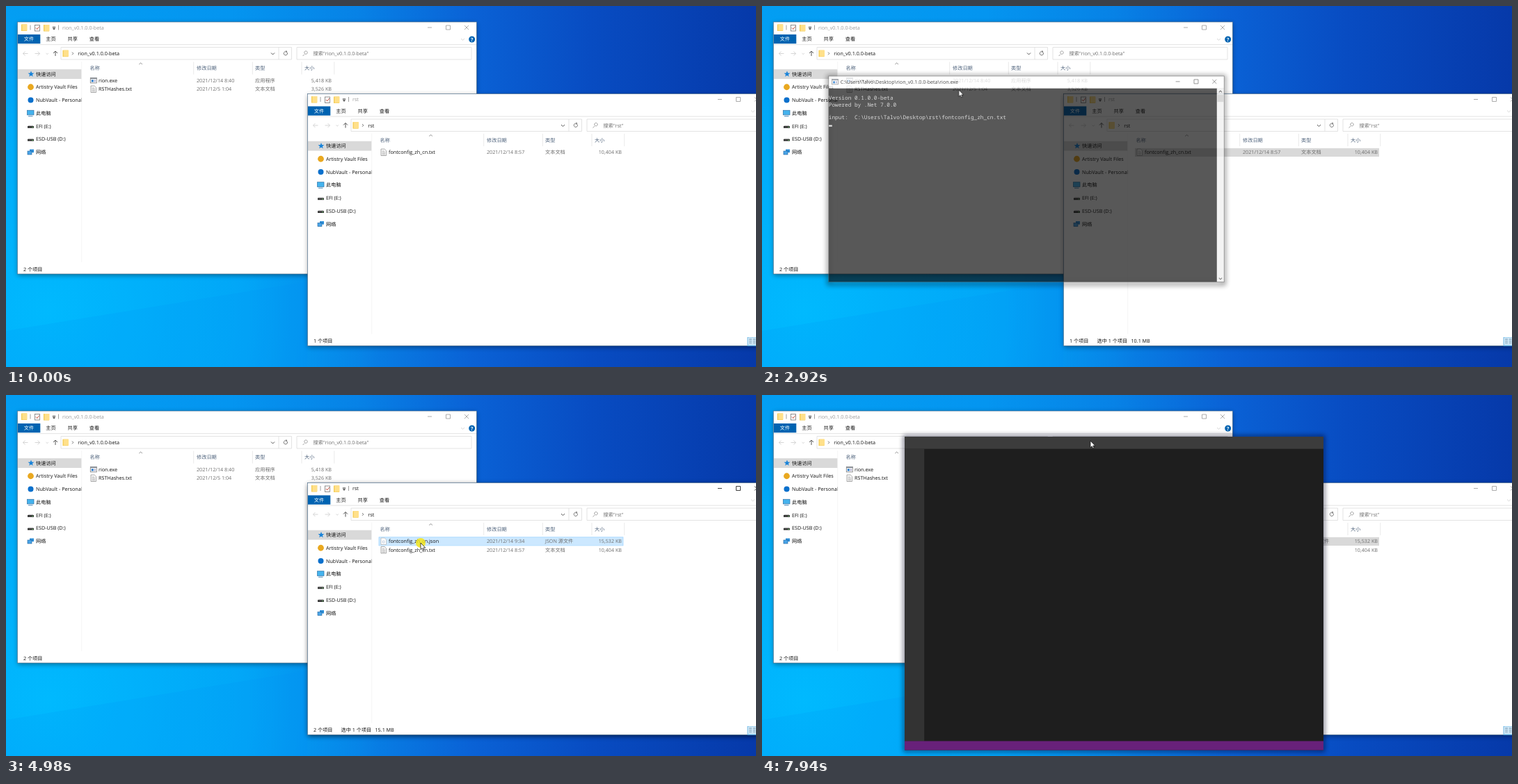
Animation of 1078x520 px, one loop 7990 ms. Source, as an HTML page:

```html
<!DOCTYPE html>
<html>
<head>
<meta charset="utf-8">
<title>Drag a file onto a converter</title>
<style>
html, body { margin: 0; width: 100%; height: 100%; overflow: hidden; background: #0795ee; }
svg { display: block; width: 1078px; height: 520px; }
text { font: 7.2px "Open Sans", "Noto Sans CJK SC", "Noto Sans CJK", sans-serif; fill: #111; white-space: pre; text-rendering: geometricPrecision; }
.sub { fill: #6d6d6d; }
.head { fill: #4c607a; }
.light { fill: #fff; }
.cap { color: #999; }
.cap text { fill: currentColor; }
.cap path { stroke: currentColor; }
.line { fill: none; stroke: #555; stroke-width: .8; }
.pale { stroke: #ccc; }
.rule { fill: none; stroke: #dcdcdc; stroke-width: .8; }
.mono text { font: 7.79px "Noto Sans Mono", "DejaVu Sans Mono", monospace; fill: #ccc; }
#console { transform-box: view-box; transform-origin: 380px 250px; }
</style>
</head>
<body>
<svg id="stage" viewBox="0 0 1078 520"></svg>
<script>
const LOOP = 7990;

// ---- drawing helpers ----
const rect = (x, y, w, h, fill, more = '') => `<rect x="${x}" y="${y}" width="${w}" height="${h}" fill="${fill}" ${more}/>`;
const text = (x, y, s, more = '') => `<text x="${x}" y="${y + 2.6}" ${more}>${s}</text>`;
const path = (d, cls = 'line', more = '') => `<path class="${cls}" d="${d}" ${more}/>`;
const dot = (x, y, r, fill, more = '') => `<circle cx="${x}" cy="${y}" r="${r}" fill="${fill}" ${more}/>`;
const group = (attrs, ...parts) => `<g ${attrs}>${parts.join('')}</g>`;
const right = 'text-anchor="end"', middle = 'text-anchor="middle"';

const folder = (x, y) => rect(x, y, 8, 9.5, '#f2c94f') + rect(x + 1.2, y, 7.3, 9, '#ffe08a');
const page = (x, y) =>
  `<path d="M${x} ${y}h5.2l2.3 2.3v7.2h-7.5z" fill="#f8f8f8" stroke="#8c8c8c" stroke-width=".7"/>` +
  path(`M${x + 1.5} ${y + 3}h3.5m-3.5 1.7h4.5m-4.5 1.7h4.5m-4.5 1.6h4.5`, 'line', 'style="stroke:#999;stroke-width:.6"');
const jsonPage = (x, y) =>
  `<path d="M${x} ${y}h5.2l2.3 2.3v7.2h-7.5z" fill="#fff" stroke="#aaa" stroke-width=".6"/>` +
  `<text x="${x + 3.7}" y="${y + 7}" ${middle} style="font-size:5px;fill:#7a8fb0">{}</text>`;
const exeIcon = (x, y) => rect(x, y, 9, 7.5, '#fff', 'stroke="#777" stroke-width=".8"') +
  rect(x, y, 9, 1.8, '#8a9099') + rect(x + 1.5, y + 3, 3, 3, '#2277c9') + rect(x + 5.5, y + 3, 2, 3, '#aac');
const buttons = (x, y) => path(`M${x - 3} ${y}h6M${x + 23.5} ${y - 3}h6v6h-6zM${x + 50} ${y - 3}l6 6m0-6l-6 6`);
const shadow = (x, y, w, h, more = '') => rect(x, y, w, h, '#000', `filter="url(#blur)" ${more}`);

// ---- explorer window ----
const navY = i => 98 + i * 18.75;
const drive = y => rect(31, y, 9, 2.8, '#333') + path(`M32 ${y - .6}h7`, 'line', 'style="stroke:#aaa"') + rect(37.5, y + 1.2, 1.4, .8, '#7f7');
const nav = [
  ['快速访问', () => '<path d="M36 93.5l1.2 3 3.2.2-2.5 2 .9 3.1-2.8-1.7-2.8 1.7.9-3.1-2.5-2 3.2-.2z" fill="#1c84d8"/>'],
  ['Artistry Vault Files', y => dot(35.5, y, 4.4, '#e9a820')],
  ['NubVault - Personal', y => dot(35.5, y, 4, '#0a70cc')],
  ['此电脑', y => rect(30.5, y - 4, 9.5, 6.6, '#45b3ee', 'stroke="#2a6fa5" stroke-width=".7"') + rect(32, y + 4, 6.5, 1, '#4a88b8')],
  ['EFI (E:)', drive],
  ['ESD-USB (D:)', drive],
  ['网络', y => rect(34, y - 4, 6, 4.6, '#2f8fd8') + rect(31, y - 1.5, 6, 5, '#4aa5e8', 'stroke="#1d5f99" stroke-width=".6"')]
];

const fileRow = (y, icon, name, date, type, size) => icon + text(133, y, name) +
  text(274, y, date, 'class="sub"') + text(358, y, type, 'class="sub"') + text(468, y, size, `class="sub" ${right}`);

const highlight = (id, y) => rect(119, y - 6, 351, 12.3, 'transparent', `id="${id}" stroke="transparent" stroke-width=".7"`);

function explorer(id, name, place, files, status) {
  const clip = `${id}Nav`;
  return group(`id="${id}" transform="translate(${place})"`,
    `<clipPath id="${clip}"><rect x="17" y="80" width="91.5" height="290"/></clipPath>`,
    shadow(17, 25, 659, 363, 'class="shade" opacity=".4"'),
    rect(16.4, 23, 660, 363, '#fff', 'stroke="#51708c" stroke-width=".7"'),
    folder(22, 26.5), path('M35 27.5v7M75.5 27.5v7', 'line', 'style="stroke:#888"'),
    rect(41.5, 27.5, 7, 8.5, '#fff', 'stroke="#777" stroke-width=".8"'), path('M43 31.5l1.7 2 3-4', 'line', 'style="stroke:#c8503c;stroke-width:1"'),
    folder(54, 27), '<path d="M66.8 30h4.4v.9h-4.4zM66.8 32h4.4l-2.2 2.3z" fill="#333"/>',
    group('class="cap"', text(81, 31.3, name), buttons(609, 31)),
    rect(17, 41, 32.3, 13.2, '#0063b1'), text(33, 47.6, '文件', `class="light" ${middle}`),
    ['主页', '共享', '查看'].map((s, i) => text(64.5 + i * 31.2, 47.6, s, middle)).join(''),
    path('M654 47l2.5 2.3 2.5-2.3', 'line pale'), dot(669.7, 48, 4.5, '#0063b1'),
    text(669.7, 48, '?', `class="light" ${middle} style="font-weight:700"`),
    path('M17 55.6h659', 'rule'),
    path('M31.5 68.5h-7l3-3m-3 3l3 3M41.5 68.5h7l-3-3m3 3l-3 3M57.5 68l1.7 1.5 1.7-1.5', 'line pale'),
    path('M71 72v-7l-3 3m3-3l3 3M381 67.5l2.5 2.5 2.5-2.5', 'line', 'style="stroke-width:1"'),
    path('M79 59.5h331.5v17.5h-331.5zM392 59.5v17.5M418 59.5h251v17.5h-251z', 'rule'),
    folder(81.5, 63.7), path('M95 66.5l1.8 1.9-1.8 1.9'), text(103.3, 68.4, name),
    path('M404 66.8a2.6 2.6 0 1 1-2.2-1.1h2m-1.4-1.4l1.6 1.4-1.6 1.4'),
    path('M429 69.6l-2.4 2.4M432.6 65.6a2.2 2.2 0 1 1-.1-.1', 'line', 'style="stroke:#888"'),
    text(441.5, 68.5, `搜索"${name}"`, 'class="sub"'),
    path('M191.3 84l2.3-2 2.3 2', 'line', 'style="stroke:#777"'),
    [['名称', 120.5], ['修改日期', 274], ['类型', 358], ['大小', 429]].map(([s, x]) => text(x, 89.6, s, 'class="head"')).join(''),
    path('M269.7 80.5v18M354.3 80.5v18M425 80.5v18M471.8 80.5v18', 'rule', 'style="stroke:#e4e4e4"'),
    path('M108.7 80v289', 'rule', 'style="stroke:#f3f3f3"'),
    rect(17, 91.2, 91.3, 13.8, '#d9d9d9'),
    group(`clip-path="url(#${clip})"`, ...nav.map(([s, icon], i) => icon(navY(i)) + text(43, navY(i), s))),
    group('class="arrows" opacity="0"', ...nav.map((_, i) => path(`M22 ${navY(i) - 2}l2 2-2 2`, 'line pale'))),
    files, status,
    rect(649, 373.5, 13, 12, '#d5ecfb', 'stroke="#52a9dc" stroke-width=".8"'),
    path('M651 376.5h4m-4 2.7h4m-4 2.7h4m1.5-5.4h4m-4 2.7h4m-4 2.7h4', 'line', 'style="stroke:#537a96"'));
}

const appFiles = highlight('appSel', 107.3) +
  fileRow(107.2, exeIcon(121.3, 103.4), 'rion.exe', '2021/12/14 8:40', '应用程序', '5,418 KB') +
  fileRow(119.6, page(122, 115), 'RSTHashes.txt', '2021/12/5 1:04', '文本文档', '3,526 KB');

const dataFiles =
  group('id="jsonRow" opacity="0"', highlight('jsonSel', 107.3),
    fileRow(107.2, jsonPage(122, 102.5), 'fontconfig_zh_cn.json', '2021/12/14 9:34', 'JSON 源文件', '15,532 KB')) +
  group('id="txtRow"', highlight('txtSel', 107.3),
    fileRow(107.2, page(122, 102.5), 'fontconfig_zh_cn.txt', '2021/12/14 8:57', '文本文档', '10,404 KB'));

const dataStatus = text(25, 379.2, '1 个项目', 'id="one"') + text(25, 379.2, '2 个项目', 'id="two"') +
  text(64.5, 379.2, '选中 1 个项目', 'id="picked"') +
  text(113.5, 379.2, '10.1 MB', 'id="txtSize"') + text(113.5, 379.2, '15.1 MB', 'id="jsonSize"');

// ---- console ----
const consoleWin = group('id="console" opacity="0"',
  `<rect x="94" y="101" width="572" height="300" fill="none" stroke="#000" stroke-width="5" opacity=".55" filter="url(#blur)"/>`,
  rect(94, 117.5, 562, 281, '#0c0c0c', 'opacity=".91"'),
  rect(94, 100, 572, 17.7, '#fff'), exeIcon(98.8, 104.5),
  text(111, 108.3, 'C:\\Users\\Talvo\\Desktop\\rion_v0.1.0.0-beta\\rion.exe'), buttons(599, 108),
  rect(655.5, 117.7, 10.5, 281, '#f0f0f0'), rect(656.2, 127, 9, 10.5, '#cdcdcd'),
  path('M658.5 123.5l2.2-2.2 2.2 2.2M658.5 392.5l2.2 2.2 2.2-2.2', 'line', 'style="stroke-width:1.1"'),
  rect(94, 100, 572, 298.6, 'none', 'stroke="#555" stroke-width=".7"'),
  group('class="mono"', text(94, 132, 'Version 0.1.0.0-beta'), text(94, 141.3, 'Powered by .Net 7.0.0'),
    text(94, 160, 'input:  C:\\Users\\Talvo\\Desktop\\rst\\fontconfig_zh_cn.txt')),
  rect(94.3, 171, 4.7, 2.2, '#ddd'));

// ---- context menu: '-' is a separator, '>' marks a submenu ----
const items = ['打开(O)', '通过 Brim 打开', '移动到 NubVault(M)', '使用 Brontavix Sentinel扫描...', '共享', '打开方式(H)>', '-',
  '授予访问权限(G)>', '-', '通过YW发送到', '-', '还原以前的版本(V)', '-', '发送到(N)>', '-', '剪切(T)', '复制(C)', '-',
  '创建快捷方式(S)', '删除(D)', '重命名(M)', '-', '属性(R)'];
function menu() {
  let y = 223.2, out = '';
  items.forEach((s, i) => {
    if (s === '-') {
      out += path(`M602 ${y - 4.7}h157`, 'rule', 'style="stroke:#999"');
      y += 4.15;
      return;
    }
    out += text(617, y, s.replace('>', ''), i ? '' : 'style="font-weight:700"');
    if (s.endsWith('>')) out += path(`M754.8 ${y - 3}l3.2 2.8-3.2 2.8`);
    y += 13.55;
  });
  return group('id="menu" opacity="0"',
    rect(599, 216.5, 168.5, 250, '#000', 'opacity=".45" filter="url(#soft)"'),
    rect(597, 214, 168.5, 250.3, '#eee', 'stroke="#a0a0a0" stroke-width=".8"'),
    rect(598.5, 216.7, 165.5, 13.4, '#fff', 'id="hover"'),
    rect(603, 218.5, 9, 9, '#1f80cf'), rect(603, 232, 9, 9, '#1f80cf'),
    dot(607.3, 250, 4.3, '#0a72d0'), rect(602.5, 258.3, 11, 11, '#1070c5'),
    path('M606 275h-2.5v6h6.5v-2M605.5 279c0-3 2-4 4-4v-2l3 3-3 2.8v-1.8c-2 0-3 .5-4 2z'), out);
}

// ---- text editor ----
const editor = `<rect id="editorShade" x="205.5" y="60.5" width="601" height="451" fill="none" stroke="#001020" stroke-width="4" opacity="0" filter="url(#blur)"/>` +
  group('id="editor" opacity="0"', rect(205, 60, 602, 451.5, '#1e1e1e'),
    group('id="splash"', rect(205, 60, 602, 17.6, '#3c3c3c'), rect(205, 77.6, 28.2, 421, '#333'), rect(205, 498.5, 602, 13, '#68217a')));

// ---- pointer with the dragged file ----
const tip = (id, w, sign, s) => group(`id="${id}"`, rect(8, 8.3, w, 11.6, '#fff', 'stroke="#777" stroke-width=".8"'),
  path(sign, 'line', 'style="stroke:#12409f;stroke-width:1.4"'), text(20, 14.2, s, 'style="fill:#12369a"'));
const mouse = group('id="mouse"',
  group('id="drag"',
    rect(-28.5, -52.5, 61, 61, '#000', 'opacity=".18" filter="url(#soft)"'),
    rect(-29, -53, 61, 61, 'url(#glass)', 'stroke="#9cc6e2" stroke-width=".6"'),
    group('opacity=".75"', '<path d="M-16-49h25l11 11v41h-36z" fill="#f7f9fa" stroke="#b5bcc2" stroke-width=".7"/><path d="M9-49v11h11z" fill="#d5dadd" stroke="#b5bcc2" stroke-width=".6"/>',
      path(Array.from({ length: 11 }, (_, i) => `M-12 ${-42 + i * 3.6}h${i < 2 ? 18 : 28}`).join(''), 'line', 'style="stroke:#b9c0c6;stroke-width:.7"'))),
  dot(0, 0, 7, '#f5e51b', 'id="press" opacity="0"'),
  '<path d="M0 0v9.7l2.2-2 1.5 3.2 1.5-.7-1.4-3.1h3z" fill="#fff" stroke="#111" stroke-width=".75"/>',
  tip('moveTip', 99, 'M10.5 14h6m-2.4-2.4l2.4 2.4-2.4 2.4', '移动到 rion_v0.1.0.0-beta'),
  tip('openTip', 55, 'M10.5 14h6m-3-3v6', '用 rion 打开'));

const stops = list => list.map(([o, c, a = 1]) => `<stop offset="${o}" stop-color="${c}" stop-opacity="${a}"/>`).join('');
document.getElementById('stage').innerHTML = `<defs>
  <filter id="blur" x="-10%" y="-10%" width="120%" height="120%"><feGaussianBlur stdDeviation="3.5"/></filter>
  <filter id="soft" x="-20%" y="-20%" width="140%" height="140%"><feGaussianBlur stdDeviation="1.4"/></filter>
  <linearGradient id="sky">${stops([[0, '#039df2'], [.3, '#0495f0'], [.47, '#0782e6'], [.62, '#0a62d6'], [.78, '#084cc2'], [1, '#0639a9']])}</linearGradient>
  <radialGradient id="glow" gradientUnits="userSpaceOnUse" cx="60" cy="440" r="480">${stops([[0, '#00bbff', .95], [.6, '#00b2fc', .6], [1, '#00a0f4', 0]])}</radialGradient>
  <linearGradient id="glass">${stops([[0, '#cfe9f8', .5], [1, '#c3e2f6', .75]])}</linearGradient></defs>` +
  rect(0, 0, 1078, 520, 'url(#sky)') + rect(0, 0, 1078, 520, 'url(#glow)') +
  '<path d="M0 468L433 397V520H0z" fill="#0090ee" opacity=".16"/>' +
  explorer('app', 'rion_v0.1.0.0-beta', '0 0', appFiles, text(25, 379.2, '2 个项目')) +
  explorer('data', 'rst', '417 103.5', dataFiles, dataStatus) +
  consoleWin + menu() + editor + mouse;

// ---- timeline: keys are [ms, value, easing?] ----
function play(sel, prop, keys, easing = 'step-end') {
  const frames = [...keys, [LOOP, keys.at(-1)[1]]].map(([t, v, e = easing]) => ({ offset: t / LOOP, [prop]: v, easing: e }));
  document.querySelectorAll(sel).forEach(el => el.animate(frames, { duration: LOOP, iterations: Infinity }));
}
// Visible between each pair of times.
const show = (sel, ...times) => play(sel, 'opacity', [...(times[0] ? [[0, 0]] : []), ...times.map((t, i) => [t, (i + 1) % 2])]);
const fade = (sel, ...keys) => play(sel, 'opacity', [[0, 0], ...keys], 'linear');

const route = [[0, 1090, 340], [250, 1072, 335], [560, 830, 262], [800, 650, 222], [1000, 594, 212], [1160, 590, 212], [1400, 520, 202],
  [1640, 410, 182], [1860, 329, 159], [2060, 281, 119], [2230, 265, 107], [2810, 265, 107], [3060, 305, 138],
  [3380, 312, 145], [3590, 378, 203], [3820, 510, 243], [4100, 588, 255], [4420, 591, 254], [4820, 596, 213],
  [5430, 596, 213], [5740, 601, 219], [5950, 625, 229], [6250, 648, 241], [6420, 648, 244], [7430, 648, 244], [7680, 560, 150], [7940, 472, 66]];
play('#mouse', 'transform', route.map(([t, x, y]) => [t, `translate(${x}px,${y}px)`]), 'linear');
show('#mouse', 250);
play('#press', 'opacity', [[0, 0], [1100, .85], [2530, 0], [4980, .85], [5040, 0], [5220, .85], [5290, 0], [6400, .85], [6480, 0]]);
show('#drag', 1200, 2530);
show('#moveTip', 1600, 2110);
show('#openTip', 2110, 2530);

const BLUE = '#cce8ff', HOVER = '#e5f3ff', GREY = '#d9d9d9', NONE = 'transparent', EDGE = '#99d1ff';
play('#appSel', 'fill', [[0, NONE], [2110, BLUE], [2530, NONE]]);
play('#txtSel', 'fill', [[0, NONE], [930, HOVER], [1100, BLUE], [2810, GREY], [3560, BLUE], [4980, NONE]]);
play('#txtSel', 'stroke', [[0, NONE], [1100, EDGE], [2810, NONE], [3560, EDGE], [4980, NONE]]);
play('#jsonSel', 'fill', [[0, NONE], [4760, HOVER], [4980, BLUE], [6960, GREY]]);
play('#jsonSel', 'stroke', [[0, NONE], [4980, EDGE], [6960, NONE]]);
play('#txtRow', 'transform', [[0, 'translateY(0px)'], [4500, 'translateY(12.5px)']]);
show('#jsonRow', 4500);
show('#one', 0, 4500);
show('#two', 4500);
show('#picked', 1100);
show('#txtSize', 1100, 4980);
show('#jsonSize', 4980);
show('#data .arrows', 3560, 4460);

const focus = [30, 250, 1100, 2810, 3560, 6960];
const focusKeys = (off, on) => [[0, off], ...focus.map((t, i) => [t, i % 2 ? off : on])];
play('#data .cap', 'color', focusKeys('#999', '#111'));
play('#data .shade', 'opacity', focusKeys(.4, .62));

fade('#console', [2800, 0], [2960, 1], [3440, 1], [3580, 0]);
play('#console', 'transform', [[0, 'scale(.93)'], [2800, 'scale(.93)', 'ease-out'], [2960, 'scale(1)'], [3440, 'scale(1)'], [3580, 'scale(.93)']], 'linear');
fade('#menu', [5420, 0], [5580, 1], [6480, 1], [6600, 0]);
play('#hover', 'transform', [[0, 'translateY(0px)'], [5970, 'translateY(13.55px)']]);
show('#hover', 5500);
fade('#editorShade', [6980, 0], [7040, .4], [7130, .7]);
fade('#editor', [6990, 0], [7040, .03], [7130, 1]);
show('#splash', 7280);
</script>
</body>
</html>
```
